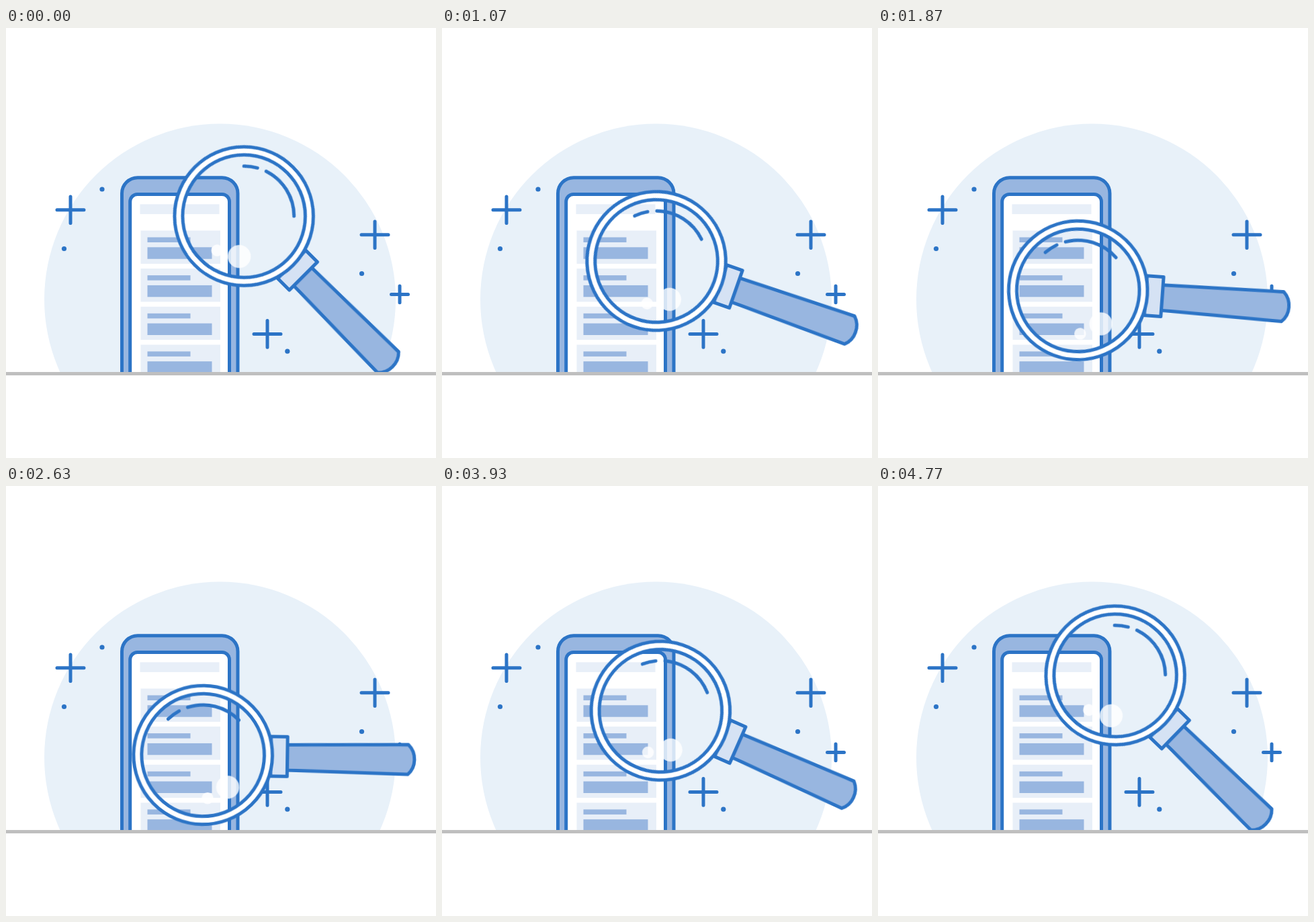
Recreate the animation shown at these times as an HTML page without scripts. Size 640 px wide and 640 px high, loop 4810 ms.

```html
<!DOCTYPE html>
<html lang="en">
<head>
<meta charset="utf-8">
<title>Mobile search</title>
<style>
  :root { --line: #2c74c6; --mid: #98b6e0; --pale: #e8eff8; }
  html, body { margin: 0; width: 100%; height: 100%; overflow: hidden; background: #fff; }
  svg { display: block; width: 100%; height: 100%; }
  .line { fill: none; stroke: var(--line); stroke-width: 5; }
  .round { stroke-linecap: round; stroke-linejoin: round; }
  .mid { fill: var(--mid); }
  .pale { fill: var(--pale); }
  .white { fill: #fff; }
  .dots { fill: var(--line); }

  .magnifier {
    transform-origin: 0 0;
    animation: scan 4.81s infinite;
  }
  @keyframes scan {
    0%, 100% {
      transform: translate(329.8px, 321.4px) rotate(45deg);
      animation-timing-function: cubic-bezier(.167, .167, .667, 1);
    }
    50% {
      transform: translate(304px, 449.5px) rotate(0deg);
      animation-timing-function: cubic-bezier(.333, 0, .833, .833);
    }
  }
</style>
</head>
<body>
<svg viewBox="0 0 640 640">
  <defs>
    <clipPath id="above"><rect width="640" height="514"/></clipPath>
    <path id="plus" class="line round" d="M-20 0H20M0 -19.8V19.8"/>
    <g id="card">
      <rect class="pale" width="118.5" height="49.4"/>
      <rect class="mid" x="10" y="10" width="64" height="7.5"/>
      <rect class="mid" x="10" y="24.8" width="96" height="17.4"/>
    </g>
  </defs>

  <g clip-path="url(#above)">
    <circle cx="318.5" cy="404" r="261.5" fill="#e8f1f9"/>

    <!-- phone -->
    <rect class="line" style="fill:var(--mid)" x="172.5" y="222.7" width="172.5" height="340" rx="23.5"/>
    <rect class="line" style="fill:#fff" x="184.7" y="247.4" width="147.8" height="320" rx="11"/>
    <rect class="pale" x="199.5" y="262.3" width="118" height="14.7"/>
    <use href="#card" x="200.5" y="301.5"/>
    <use href="#card" x="200.5" y="358.1"/>
    <use href="#card" x="200.5" y="414.8"/>
    <use href="#card" x="200.5" y="471.4"/>

    <!-- sparkles -->
    <use href="#plus" x="96" y="270.7"/>
    <use href="#plus" x="549" y="307.7"/>
    <use href="#plus" x="389" y="455.4"/>
    <path class="line round" d="M573.5 396.4H598.5M586 384V408.8"/>
    <g class="dots">
      <circle cx="143" cy="240" r="3.6"/>
      <circle cx="86.5" cy="328.5" r="3.6"/>
      <circle cx="529.5" cy="365.5" r="3.6"/>
      <circle cx="418.8" cy="481.2" r="3.6"/>
    </g>

    <g class="magnifier">
      <!-- lens centre sits off the pivot -->
      <g transform="translate(-12 -46.5)">
        <path class="line round" style="fill:var(--mid)" d="M125.6 -17L305.5 -20C318 -8 318 13 305 24.3L125.6 20.7Z"/>
        <path class="line" style="fill:#d5e2f4" stroke-linejoin="round" d="M101 -28.9H125.6V30H101Z"/>
        <circle r="97.4" fill="none" stroke="#fff" stroke-width="12"/>
        <circle class="line" r="103.3"/>
        <circle class="line" r="91.3"/>
        <path class="line round" d="M-52.7 -52.7A74.5 74.5 0 0 1 -36.6 -64.9M-23.8 -70.6A74.5 74.5 0 0 1 52.7 -52.7"/>
        <g class="white" fill-opacity=".8">
          <circle cx="37.5" cy="47.4" r="17.2"/>
          <circle cx="7.8" cy="64.3" r="8.8"/>
        </g>
      </g>
    </g>
  </g>

  <rect y="512" width="640" height="5" fill="#bfbfbf"/>
</svg>
</body>
</html>
```
